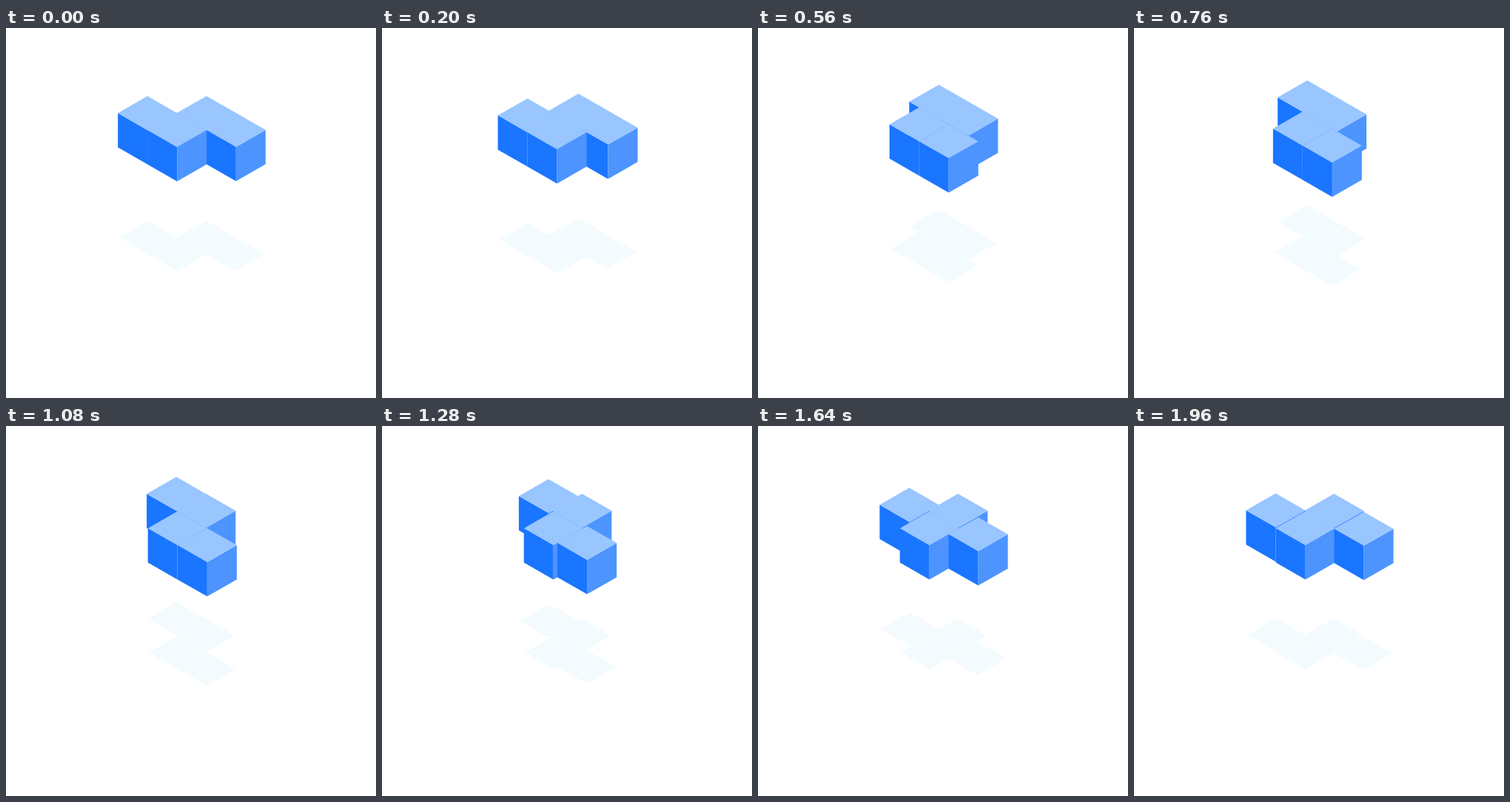
Write an HTML page with a canvas that moves like this. It is 500x500 px and loops after 2000 ms.

```html
<!DOCTYPE html>
<html>
<head>
<meta charset="utf-8">
<style>
  html, body { margin: 0; width: 100%; height: 100%; overflow: hidden; background: #fff; }
  canvas { display: block; }
</style>
</head>
<body>
<canvas id="stage" width="500" height="500"></canvas>
<script>
const ctx = document.getElementById('stage').getContext('2d');
const LOOP = 2000, W = 40, H = 22.94, TALL = 46.3;
const CENTER_X = 251, CENTER_Y = 126.4;
const TOP = '#99c6ff', LEFT = '#1a75ff', RIGHT = '#4d94ff', SHADOW = '#f3fbff';

// Sine ease over one second from the given start
function ease(t, start) {
  const k = Math.min(1, Math.max(0, (t - start) / 1000));
  return (1 - Math.cos(Math.PI * k)) / 2;
}

// Grid cell to the back corner of its top face, relative to the centre
const project = ([x, y]) => [(x - y - 0.5) * W, (x + y - 2.5) * H];

function addPath(points) {
  points.forEach(([x, y], i) => i ? ctx.lineTo(x, y) : ctx.moveTo(x, y));
  ctx.closePath();
}

function fill(color, ...points) {
  ctx.fillStyle = color;
  ctx.beginPath();
  addPath(points);
  ctx.fill();
}

function drawBox(cell) {
  const [x, y] = project(cell);
  const left = [x - W, y + H], front = [x, y + 2 * H], right = [x + W, y + H];
  const down = ([px, py]) => [px, py + TALL];
  fill(LEFT, left, front, down(front), down(left));
  fill(RIGHT, front, right, down(right), down(front));
  fill(TOP, [x, y], right, front, left);
}

function drawShadow(cells) {
  ctx.fillStyle = SHADOW;
  ctx.beginPath();
  for (const cell of cells) {
    const [x, y] = project(cell);
    addPath([[x, y], [x + W, y + H], [x, y + 2 * H], [x - W, y + H]]);
  }
  ctx.fill();
}

function draw(t) {
  // Rows slide past each other, then the outer columns do
  const u = 1.0175 * ease(t, -40), v = 0.9875 * ease(t, 1040);
  // Back to front
  const cells = [[1 - u, v], [2 - u, 0], [u, 1], [1 + u, 1 - v]];

  ctx.setTransform(1, 0, 0, 1, 0, 0);
  ctx.clearRect(0, 0, 500, 500);
  ctx.setTransform(0.98, 0, 0, 0.98, CENTER_X, CENTER_Y + 168);
  drawShadow(cells);
  ctx.setTransform(1, 0, 0, 1, CENTER_X, CENTER_Y);
  cells.forEach(drawBox);
}

const start = performance.now();
function tick() {
  draw((performance.now() - start) % LOOP);
  requestAnimationFrame(tick);
}
tick();
</script>
</body>
</html>
```
